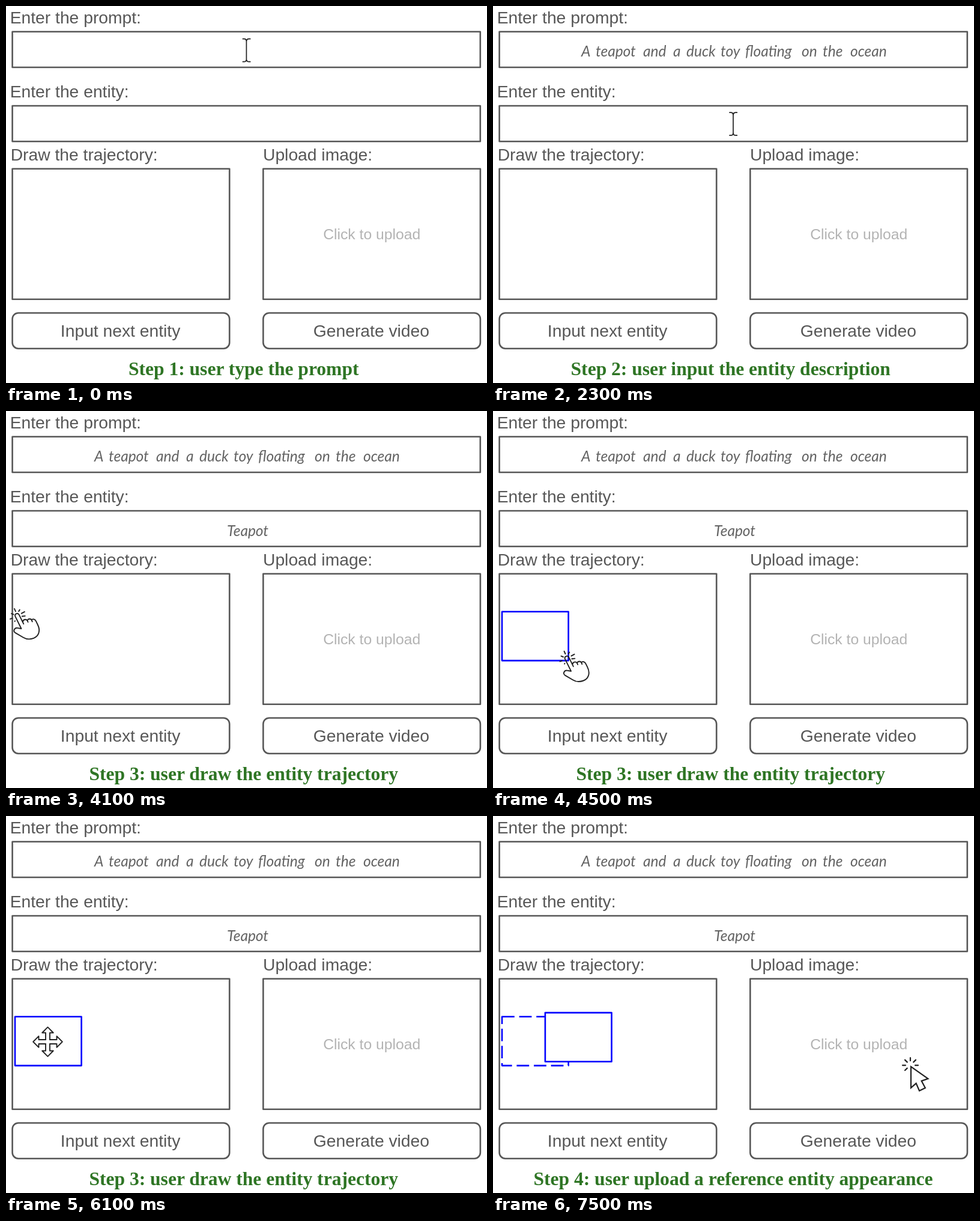
An HTML page for the animation above (8000 ms loop, 801 by 627 pixels).

```html
<!DOCTYPE html>
<html lang="en">
<head>
<meta charset="utf-8">
<title>Prompt form walkthrough</title>
<style>
  html, body { margin: 0; width: 100%; height: 100%; overflow: hidden; background: #fff; }
  svg { display: block; }
  text { font: 28.25px "Liberation Sans", Arial, sans-serif; fill: #575757; }
  .mid { text-anchor: middle; }
  .hint { font-size: 24.7px; fill: #b3b3b3; }
  .hand { font: italic 24.5px Lato, "Open Sans", sans-serif; fill: #636363; }
  .step { font: bold 31.55px "Liberation Serif", Times, serif; fill: #2e7524; }
  .box { fill: none; stroke: #575757; stroke-width: 2.6; stroke-linejoin: round; }
  .region { fill: #fff; stroke: #00f; stroke-width: 2.6; stroke-linejoin: round; }
  .dashed { stroke-dasharray: 20.8 7.8; }
  .cursor { fill: none; stroke: #222; stroke-width: 1.9; stroke-linecap: round; stroke-linejoin: round; }
</style>
</head>
<body>
<svg id="stage" width="801" height="627" viewBox="0 0 801 627">
  <defs>
    <path id="arm" d="M-3.5 -3.5V-15H-9.3L0 -24.3L9.3 -15H3.5V-3.5"/>
  </defs>

  <text x="6.7" y="29.3">Enter the prompt:</text>
  <text x="6.7" y="152.3">Enter the entity:</text>
  <text x="7.7" y="257.3">Draw the trajectory:</text>
  <text x="428" y="257.3">Upload image:</text>
  <text class="mid" x="190.6" y="550">Input next entity</text>
  <text class="mid" x="608.4" y="550">Generate video</text>
  <text class="mid hint" x="609.2" y="388.3">Click to upload</text>
  <g id="boxes"></g>

  <text id="prompt" class="hand" y="84"></text>
  <text id="entity" class="hand mid" x="402.5" y="208">Teapot</text>
  <text id="step" class="mid step" y="614"></text>

  <rect id="start" class="region" x="15" y="333.7" width="110.6" height="81.4"/>
  <rect id="moved" class="region" x="86.9" y="327.1" width="110.6" height="81.4"/>

  <g id="beam" class="cursor" style="stroke-width:1.7">
    <path d="M-6 -19H-4Q0 -19 0 -14.5V14.5Q0 19 -4 19H-6M6.3 -19H4.3Q0 -19 0 -14.5M0 14.5Q0 19 4.3 19H6.3"/>
  </g>
  <g id="finger" class="cursor">
    <path d="M6.5 21.5L-3.6 1.2C-5.2 -3 0.6 -5.8 2.8 -1.6L10.3 13.6
      M9 11C8.5 6.6 14.6 4.2 16.8 8.6L17.6 10.5M16.5 8C18 4.5 22.6 4.2 24 8L24.8 9.8
      M23.3 7C26 4.6 29.4 5.8 31 9.2L33.6 14.5C39.5 26 34.5 34.5 27 37.3C20 40 14 38.8 9.5 36
      L-3.5 28.4C-8 25.5 -4.5 19.7 0 20.4L6.5 21.5"/>
    <path d="M-12 5.4L-8.6 4.2M-10 -3.6L-6.5 -2.2M-5 -11.7L-3 -7.2M3.8 -10L2.2 -7.2M6.8 -3.8L12 -6.6M7.8 1L12.8 0.4M-4 8.6L-4.4 9.4"/>
  </g>
  <g id="mover" class="cursor">
    <use href="#arm"/>
    <use href="#arm" transform="rotate(90)"/>
    <use href="#arm" transform="rotate(180)"/>
    <use href="#arm" transform="rotate(270)"/>
  </g>
  <g id="pointer" class="cursor" transform="translate(695 415)" style="stroke-width:2.2">
    <path stroke-linejoin="miter" fill="#fff" d="M1 1.8V37L9.6 29.6L15 42L24.8 37.2L18.6 25.6L29.4 21.8Z"/>
    <path d="M0 -13V-8M-13 -0.4H-8M8 -0.4H13M-9 -9.4L-5.2 -5.6M9 -9.4L5.2 -5.6M-9 8L-5.2 4.4"/>
  </g>
</svg>
<script>
const LOOP = 8000;
const el = id => document.getElementById(id);

const addBox = (x, y, width, height, rx = 0) => {
  const rect = document.createElementNS("http://www.w3.org/2000/svg", "rect");
  for (const [key, value] of Object.entries({ class: "box", x, y, width, height, rx })) {
    rect.setAttribute(key, value);
  }
  el("boxes").append(rect);
};
addBox(10.6, 42.8, 779.2, 59.2);
addBox(10.6, 166, 779.2, 59.2);
for (const x of [10.6, 428.3]) {
  addBox(x, 270.8, 361.6, 217);
  addBox(x, 510.5, 361.6, 59.2, 10);
}

// Each word of the handwritten line starts at its own place.
const words = "A teapot and a duck toy floating on the ocean".split(" ");
const starts = [147, 171, 250, 300, 322, 379, 420, 514, 549, 595];
el("prompt").innerHTML = words.map((word, i) => `<tspan x="${starts[i]}">${word}</tspan>`).join(" ");

const steps = [
  { from: 0, x: 395.7, text: "Step 1: user type the prompt" },
  { from: 500, x: 395.7, text: "Step 2: user input the entity description" },
  { from: 3500, x: 395.7, text: "Step 3: user draw the entity trajectory" },
  { from: 7500, x: 400, text: "Step 4: user upload a reference entity appearance" }
];

const cursors = [
  { from: 0, id: "beam", x: 400.4, y: 73.7 },
  { from: 500, id: "beam", x: 400, y: 196.2 },
  { from: 3500, id: "finger", x: 19, y: 340.5 },
  { from: 4500, id: "finger", x: 123.5, y: 411.2 },
  { from: 5500, id: "mover", x: 69.5, y: 375.5 },
  { from: 6500, id: "mover", x: 141.4, y: 368.2 },
  { from: 7500, id: "pointer", x: 695, y: 415 }
];

const current = (list, time) => list.findLast(item => time >= item.from);
const show = (id, visible) => el(id).setAttribute("visibility", visible ? "visible" : "hidden");

function draw(time) {
  const step = current(steps, time);
  el("step").textContent = step.text;
  el("step").setAttribute("x", step.x);

  show("prompt", time >= 500);
  show("entity", time >= 3500);
  show("start", time >= 4500);
  show("moved", time >= 6500);
  el("start").classList.toggle("dashed", time >= 6500);

  const cursor = current(cursors, time);
  for (const id of ["beam", "finger", "mover", "pointer"]) show(id, id === cursor.id);
  el(cursor.id).setAttribute("transform", `translate(${cursor.x} ${cursor.y})`);
}

const begin = performance.now();
function tick() {
  draw((performance.now() - begin) % LOOP);
  requestAnimationFrame(tick);
}
tick();
</script>
</body>
</html>
```
